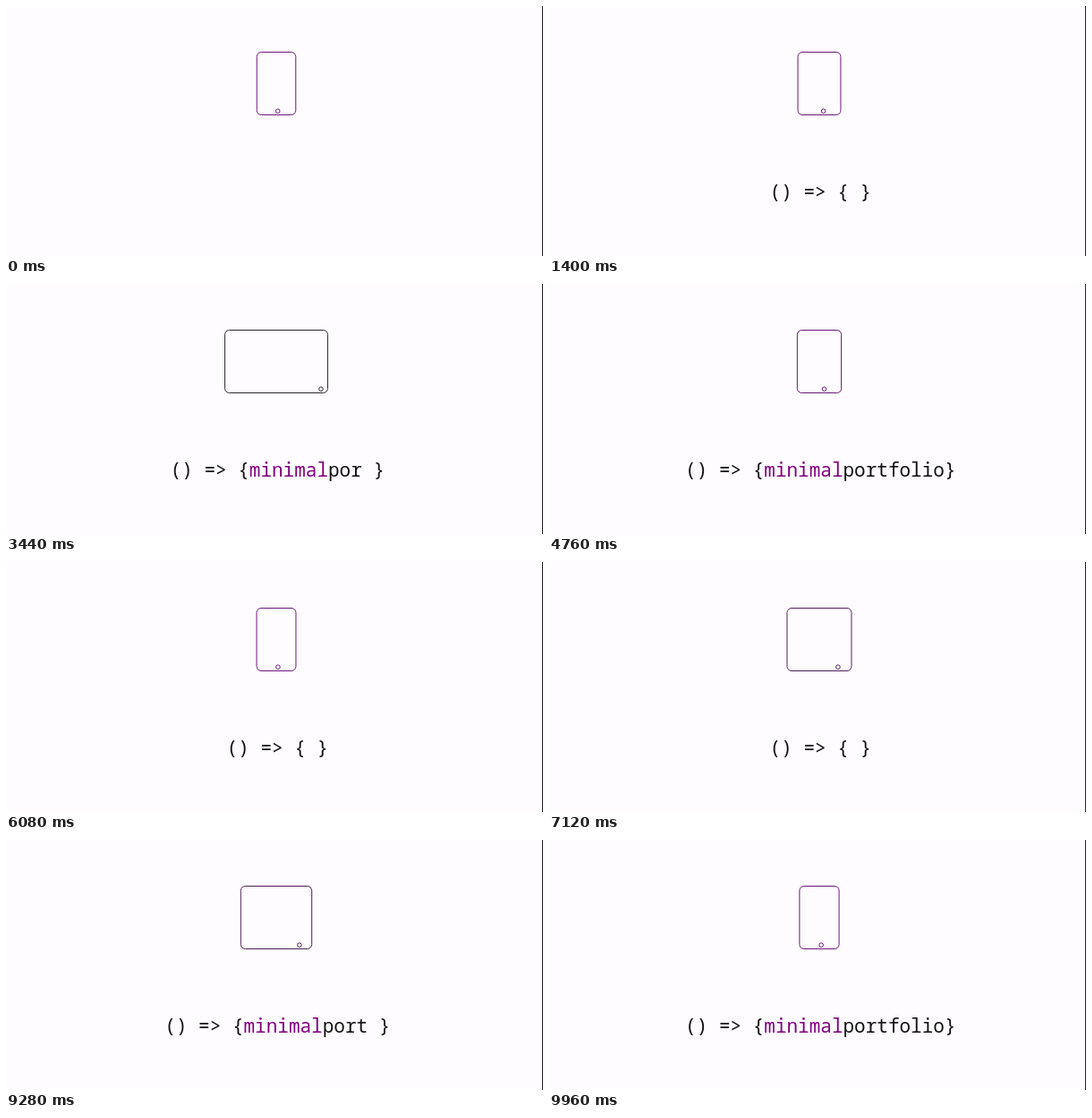
An HTML page with a canvas for the animation above (10 s loop, 600 by 279 pixels).

```html
<!DOCTYPE html>
<html lang="en">
<head>
<meta charset="utf-8">
<title>Minimal portfolio</title>
<style>
html, body { margin: 0; width: 600px; height: 279px; overflow: hidden; background: #fefcff; }
canvas { display: block; }
</style>
</head>
<body>
<canvas id="stage" width="600" height="279"></canvas>
<script>
const ctx = document.getElementById('stage').getContext('2d');
const LOOP = 10000, RESTART = 5190, PERIOD = 5000;
const FONT = '500 21px "Noto Sans Mono", "DejaVu Sans Mono", monospace';

const OPENING = '() => { }';
const WORD = 'minimalportfolio';
const ACCENT = 7;
const WORD_TIMES = [1960, 2060, 2190, 2310, 2600, 2800, 3000, 3160,
                    3290, 3380, 3500, 4475, 4530, 4580, 4630, 4685];
const CLOSE_UP = 4715;

function bezier(x1, y1, x2, y2) {
  const at = (a, b, s) => 3 * a * s * (1 - s) ** 2 + 3 * b * s * s * (1 - s) + s ** 3;
  return x => {
    let lo = 0, hi = 1;
    for (let i = 0; i < 24; i++) {
      const mid = (lo + hi) / 2;
      if (at(x1, x2, mid) < x) lo = mid; else hi = mid;
    }
    return at(y1, y2, lo);
  };
}
const grow = bezier(0.7, 0, 0.4, 1);
const shrink = bezier(0.25, 0.1, 0.25, 1);
const mix = (a, b, k) => a + (b - a) * k;

// 0 = portrait, 1 = landscape
function spread(t) {
  const u = (t - 350 + PERIOD) % PERIOD;
  return u < 3500 ? grow(u / 3500) : 1 - shrink((u - 3500) / 1500);
}

function drawDevice(t) {
  const k = spread(t), w = mix(41, 116, k), left = 302 - w / 2;
  const rgb = [112, 20, 128].map(c => Math.round(mix(c, 40, k)));
  ctx.strokeStyle = `rgb(${rgb})`;
  ctx.lineWidth = 1;
  ctx.beginPath();
  ctx.roundRect(left, 51.5, w, 70, 5);
  ctx.stroke();
  ctx.beginPath();
  ctx.arc(left + w - mix(20.5, 7.3, k), 117.2, 2.3, 0, Math.PI * 2);
  ctx.stroke();
}

function textParts(u) {
  const typed = WORD_TIMES.filter(at => at <= u).length;
  if (!typed) {
    const n = u < 40 ? 0 : Math.floor((u - 20) / 100) + 1;
    return [OPENING.slice(0, n).trimEnd(), '', ''];
  }
  const word = WORD.slice(0, typed);
  return ['() => {', word.slice(0, ACCENT), word.slice(ACCENT) + (u < CLOSE_UP ? ' }' : '}')];
}

function drawText(t) {
  const parts = textParts(t < RESTART ? t : t - RESTART);
  ctx.font = FONT;
  let x = 303.3 - ctx.measureText(parts.join('')).width / 2;
  parts.forEach((part, i) => {
    ctx.fillStyle = i === 1 ? '#800080' : '#111';
    ctx.fillText(part, x, 215);
    x += ctx.measureText(part).width;
  });
}

function frame(now) {
  const t = now % LOOP;
  ctx.fillStyle = '#fefcff';
  ctx.fillRect(0, 0, 600, 279);
  ctx.fillStyle = '#222';
  ctx.fillRect(599, 0, 1, 279);
  drawDevice(t);
  drawText(t);
  requestAnimationFrame(frame);
}
requestAnimationFrame(frame);
</script>
</body>
</html>
```
